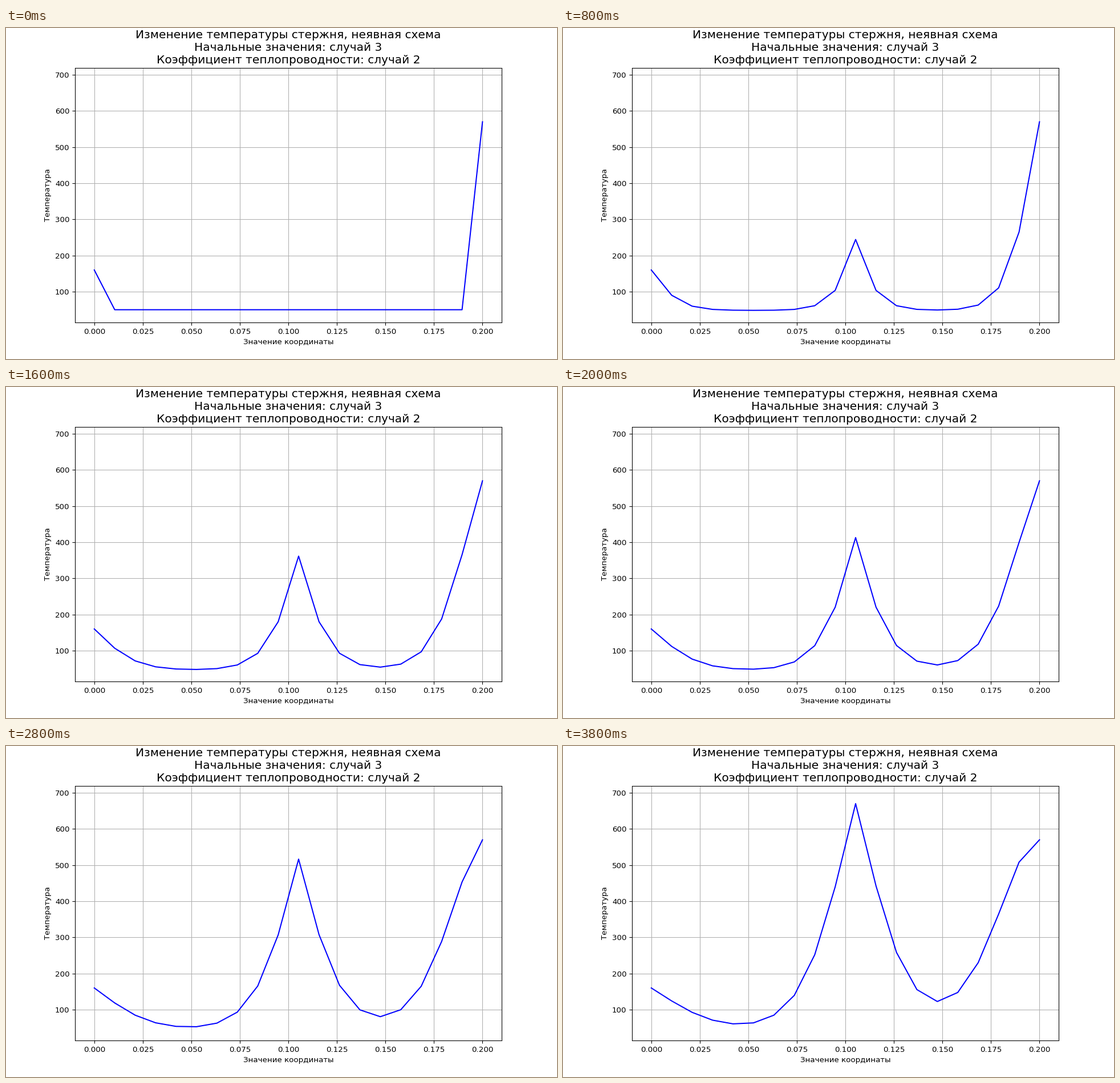
Recreate the animation shown at these times as a matplotlib script. Size 966x580 px, loop 4 s.

```python
import numpy as np
import matplotlib.pyplot as plt
from matplotlib.animation import FuncAnimation

FRAMES, INTERVAL = 20, 200
DPI = 96.6
NODES, LENGTH = 20, 0.2
LEFT, RIGHT, START = 160, 570, 50   # fixed ends and initial temperature
HEATER, POWER = NODES // 2, 84      # heated node and its gain per step
GAIN, BALANCE = 1.38e-4, 120        # inner heat release: GAIN * T * (T - BALANCE)


def conductivity(t):
    return 0.165 + 0.9e-4 * t


def implicit_step(t):
    """Advance the rod by one implicit step with frozen coefficients."""
    k = conductivity((t[1:] + t[:-1]) / 2)
    system, rhs = np.eye(NODES), t.copy()
    for i in range(1, NODES - 1):
        system[i, i - 1] = -k[i - 1]
        system[i, i + 1] = -k[i]
        system[i, i] += k[i - 1] + k[i] - GAIN * (t[i] - BALANCE)
    rhs[HEATER] += POWER
    return np.linalg.solve(system, rhs)


rod = np.full(NODES, float(START))
rod[0], rod[-1] = LEFT, RIGHT
history = [rod]
for _ in range(FRAMES - 1):
    history.append(implicit_step(history[-1]))

# The small margin keeps the pixel size from rounding down.
fig, ax = plt.subplots(figsize=(966.01 / DPI, 580.01 / DPI), dpi=DPI)
line, = ax.plot(np.linspace(0, LENGTH, NODES), history[0], "b")
ax.set_xlim(-0.01, 0.21)
ax.set_ylim(14.4, 719.6)
ax.set_title("Изменение температуры стержня, неявная схема\n"
             "Начальные значения: случай 3\n"
             "Коэффициент теплопроводности: случай 2", fontsize=15)
ax.set_xlabel("Значение координаты")
ax.set_ylabel("Температура")
ax.grid()


def update(step):
    line.set_ydata(history[step])
    return line,


anim = FuncAnimation(fig, update, frames=FRAMES, interval=INTERVAL, repeat=True)
plt.show()
```
